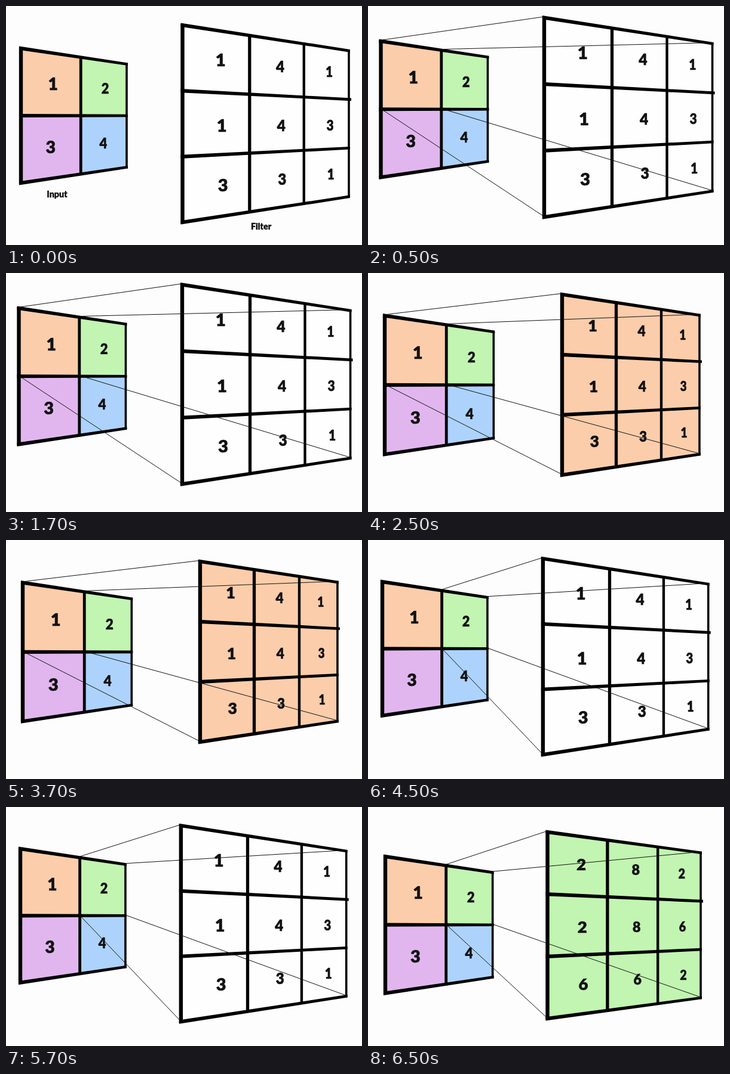
An HTML page that plays this animation: 596x401 px, repeating every 8 s.

```html
<!DOCTYPE html>
<html lang="en">
<head>
<meta charset="utf-8">
<title>Transposed convolution</title>
<style>
  html, body { margin: 0; width: 100%; height: 100%; overflow: hidden; background: #fdfdfd; }
  svg { display: block; width: 100%; height: 100%; }
  text {
    font-family: Lato, "Open Sans", sans-serif; font-weight: 900;
    fill: #111; stroke: #111; stroke-width: .5; text-anchor: middle;
  }
  .label { font-size: 14.3px; stroke-width: .3; }
  .ray { stroke: #111; stroke-width: 1; }
  .scene { visibility: hidden; animation: mid 8s step-end infinite; }
  .scene:nth-child(1) { animation-name: first; }
  .scene:nth-child(2) { animation-delay: .5s; }
  .scene:nth-child(3) { animation-delay: 2.5s; }
  .scene:nth-child(4) { animation-delay: 4.5s; }
  .scene:nth-child(5) { animation-name: last; animation-delay: 6.5s; }
  @keyframes first { 0% { visibility: visible; } 6.25%, 100% { visibility: hidden; } }
  @keyframes mid { 0% { visibility: visible; } 25%, 100% { visibility: hidden; } }
  @keyframes last { 0% { visibility: visible; } 18.75%, 100% { visibility: hidden; } }
</style>
</head>
<body>
<svg id="stage" viewBox="0 0 596 401"></svg>
<script>
const WHITE = '#fefefe';
const COLORS = ['#fbcdab', '#c1f5b1', '#e1b6ef', '#add3fc'];
const INPUT = [1, 2, 3, 4];
const KERNEL = [1, 4, 1, 1, 4, 3, 3, 3, 1];

// Filter placement relative to the input grid; taper is the slope of its edges
const WIDE = { dx: 270.5, dy: -39, w: 278.5, h: 331, taper: 0.13 };

const poly = (pts, fill) => `<polygon points="${pts.join(' ')}" fill="${fill}"/>`;
const label = (x, y, s) => `<text class="label" x="${x}" y="${y}">${s}</text>`;

// Maps the unit square to a panel turned away from the viewer
function perspective({ x, y, w, h, taper }) {
  const g = 1 / (1 - 2 * taper) - 1;
  return (u, v) => {
    const p = (1 + g) * u / (1 + g * u);
    return { p, x: x + w * p, y: y + h * (taper * p + v * (1 - 2 * taper * p)) };
  };
}

function digit(value, { p, x, y }, zoom) {
  const size = (29.5 - 6.5 * p) * zoom;
  return `<text transform="translate(${x} ${y + size * 0.36}) scale(${1.1 - 0.25 * p} 1)" ` +
    `font-size="${size}">${value}</text>`;
}

function rowBar(a, b, nub) {
  const slope = (b.y - a.y) / (b.x - a.x);
  const x0 = a.x - 3, x1 = b.x + 2 + nub;
  const y0 = a.y - 3 * slope, y1 = b.y + (2 + nub) * slope;
  return poly([x0, y0 - 3.1, x1, y1 - 2.3, x1, y1 + 2.3, x0, y0 + 3.1], '#000');
}

function columnBar(a, b) {
  const half = 3.2 - 1.4 * a.p;
  return poly([a.x - half, a.y - 2, a.x + half, a.y - 2,
    b.x + half, b.y + 2, b.x - half, b.y + 2], '#000');
}

// rowMids: height of the digits in each row; shift, lean: their sideways offset
function grid(at, values, fills, { zoom, rowMids, shift, lean, nub = 0 }) {
  const n = rowMids.length;
  let cells = '', bars = '', digits = '';
  values.forEach((value, i) => {
    const c = i % n, r = Math.floor(i / n);
    const corners = [[c, r], [c + 1, r], [c + 1, r + 1], [c, r + 1]];
    const pts = corners.flatMap(([u, v]) => {
      const q = at(u / n, v / n);
      return [q.x, q.y];
    });
    cells += poly(pts, fills[i % fills.length]);
    digits += digit(value, at((c + 0.5 + shift) / n + lean * r, rowMids[r]), zoom);
  });
  for (let i = 0; i <= n; i++) {
    const t = i / n;
    bars += rowBar(at(0, t), at(1, t), i === 1 ? nub : 0) + columnBar(at(t, 0), at(t, 1));
  }
  return cells + bars + digits;
}

// Joins the corners of one input cell to the corners of the filter
function rays(from, to, cell) {
  let out = '';
  for (const u of [0, 1])
    for (const v of [0, 1]) {
      const a = from((cell + u) / 2, v / 2), b = to(u, v);
      out += `<line class="ray" x1="${a.x}" y1="${a.y}" x2="${b.x}" y2="${b.y}"/>`;
    }
  return `<g transform="translate(-1 -1.5)">${out}</g>`;
}

function scene({ x, y, k, shape = WIDE, cell = -1, filled = false, extra = '' }) {
  const left = perspective({ x, y, w: 177 * k, h: 226 * k, taper: 0.117 });
  const right = perspective({
    x: x + shape.dx * k, y: y + shape.dy * k,
    w: shape.w * k, h: shape.h * k, taper: shape.taper
  });
  const factor = filled ? INPUT[cell] : 1;
  const input = grid(left, INPUT, COLORS,
    { zoom: k, rowMids: [0.25, 0.75], shift: 0, lean: -0.02 });
  const filter = grid(right, KERNEL.map(v => v * factor), [filled ? COLORS[cell] : WHITE],
    { zoom: k * shape.h / WIDE.h, rowMids: [0.157, 0.51, 0.833], shift: 0.04, lean: 0.006, nub: 2 });
  const lines = cell < 0 ? '' : rays(left, right, cell);
  return `<g class="scene">${input}${filter}${lines}${extra}</g>`;
}

const names = label(85.5, 321, 'Input') + label(427, 375, 'Filter');

document.getElementById('stage').innerHTML = [
  { x: 25, y: 71, k: 1, extra: names },
  { x: 21.5, y: 59, k: 1.011, cell: 0 },
  { x: 28, y: 71.5, k: 1.03, cell: 0, filled: true,
    shape: { dx: 288.3, dy: -34.5, w: 223.3, h: 294.2, taper: 0.115 } },
  { x: 24, y: 70, k: 0.994, cell: 1 },
  { x: 29, y: 83, k: 1.015, cell: 1, filled: true,
    shape: { dx: 267.5, dy: -40.4, w: 252.7, h: 308.4, taper: 0.111 } }
].map(scene).join('');
</script>
</body>
</html>
```
